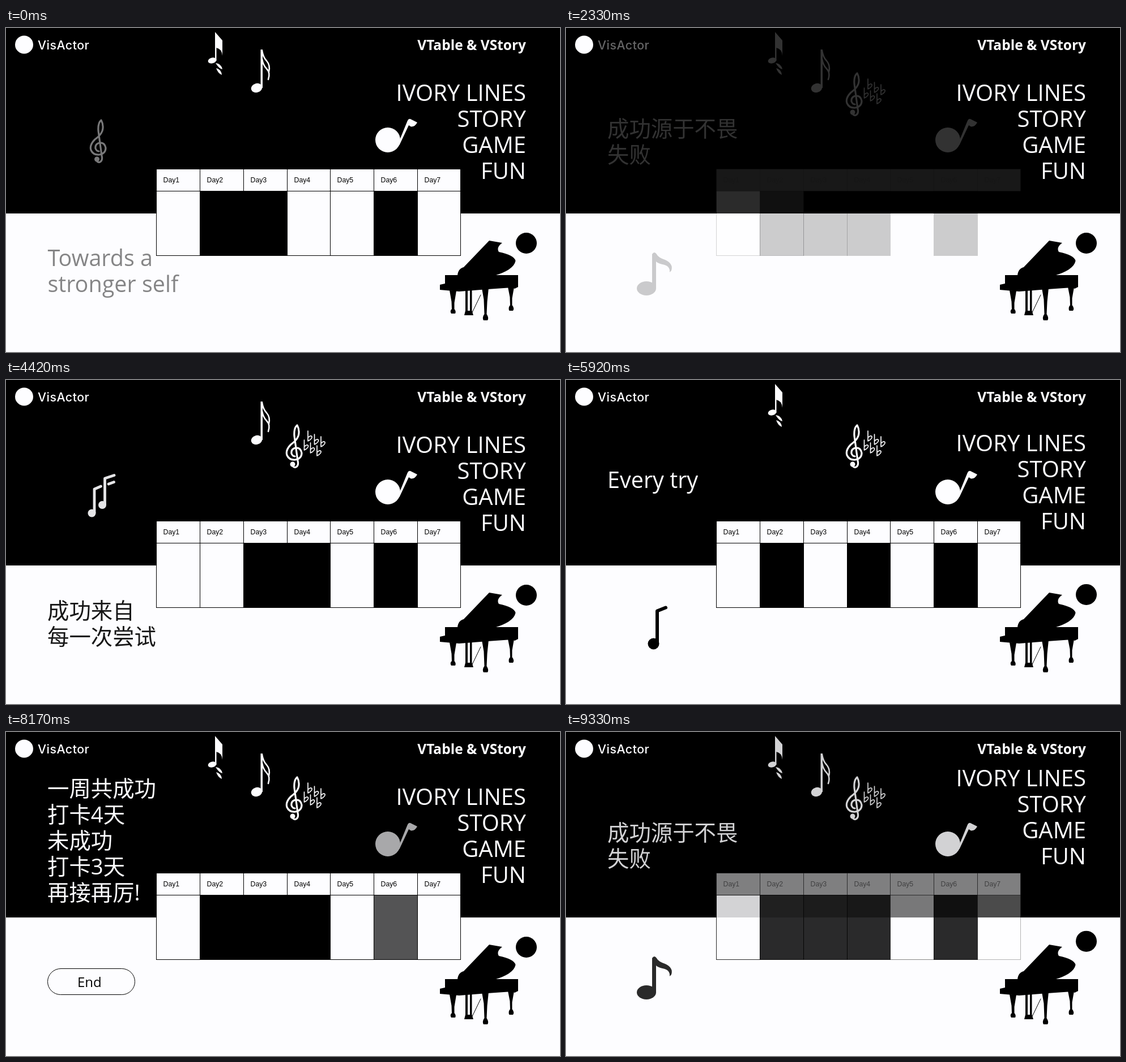
An HTML page that plays this animation: 978 by 573 pixels, repeating every 9.41 s.

```html
<!DOCTYPE html>
<html lang="en">
<head>
<meta charset="utf-8">
<title>Practice week</title>
<style>
  html, body { margin: 0; height: 100%; overflow: hidden; background: #fdfdff; }
  svg { display: block; width: 978px; height: 573px; }
  text { font-family: "Open Sans", "Noto Sans CJK SC", "Noto Sans CJK", sans-serif; font-size: 39.5px; }
  .cjk { font-size: 38.4px; }
  .title { font-size: 40px; text-anchor: end; }
  .label { font: 12.3px "Liberation Sans", Arial, sans-serif; }
  .light { fill: #fdfdff; }
  .line { fill: none; stroke: #000; stroke-linecap: round; stroke-linejoin: round; }
  .light .line, .line.light { fill: none; stroke: #fdfdff; }
</style>
</head>
<body>
<svg viewBox="0 0 978 573">
  <defs>
    <path id="clef" class="line light" stroke-width="3.200" d="M11 70Q13 77 18 75Q23 72 21 64L15 20Q14 6 20 1Q25 10 22 20Q19 28 9 35Q-1 45 2 54Q6 63 17 62Q28 60 28 50Q26 40 17 41Q9 43 10 51Q12 56 16 56"/>
    <path id="flat" class="line light" stroke-width="1.700" d="M0 0V18Q8 14 7 10Q5 7 0 12"/>
  </defs>

  <g id="stage">
    <rect width="978" height="328"/>
    <circle class="light" cx="32" cy="29.500" r="16"/>
    <text class="light" x="918" y="39" text-anchor="end" style="font-size:24.5px;font-weight:700">VTable &amp; VStory</text>
    <g id="title" class="light"></g>
    <g id="piano">
      <path d="M797 438C798 428 802 425 808 423L853 376L876 380Q865 388 870 396Q898 402 899.500 412Q896 428 862 438Z"/>
      <path d="M775 437H904V458L898 461L893 459L850 462L800 466L766 463V454L775 452Z"/>
      <path d="M783 464L795 465L791.500 486V497Q795 501 793 505H786Q783 500 787 497L786.500 484Z"/>
      <path d="M840 460H852L849.500 484L848.500 506Q853 513 850 517H843Q840 512 844.500 506L843.500 480Z"/>
      <path d="M886 458H897L893.500 478V490Q898 496 895 500H888.500Q886 495 890 490L889.500 476Z"/>
      <path d="M811 464H815V500H819V464H822.500V500L825 508H809L811 500Z"/>
      <path class="line" d="M838 472L823 503"/>
    </g>
    <circle id="badge" cx="918.500" cy="380.500" r="18.500"/>
  </g>
  <text id="brand" class="light" x="56" y="38" style="font:500 21.3px Inter,sans-serif;letter-spacing:.5px">VisActor</text>

  <g id="table"></g>

  <g class="light">
    <g id="note2">
      <ellipse cx="364" cy="57.500" rx="7.500" ry="5" transform="rotate(-15 364 57.5)"/>
      <path d="M369 7L382 22V49Q381 37 371.500 35V58H369ZM370 62Q380 63 382 73Q376 72 370 62ZM371 71Q380 73 381 83Q374 80 371 71Z"/>
    </g>
    <g id="note3">
      <ellipse cx="442.500" cy="106" rx="10" ry="8" transform="rotate(-18 442.5 106)"/>
      <path d="M449.500 38H453V106H449.500Z"/>
      <path class="line" stroke-width="2.600" d="M452 40Q454 52 460 58Q467 66 464 78M452 55Q454 66 460 72Q467 79 463 91"/>
    </g>
    <g id="note4">
      <use href="#clef" x="494" y="79"/>
      <circle cx="506" cy="149" r="4.500"/>
      <use href="#flat" x="533" y="90"/><use href="#flat" x="544.500" y="96"/><use href="#flat" x="556" y="100"/>
      <use href="#flat" x="526.500" y="106"/><use href="#flat" x="537.500" y="111"/><use href="#flat" x="549" y="116"/>
    </g>
    <g id="note6">
      <circle cx="674" cy="198" r="22"/>
      <path d="M688 215L708 166Q710 160 714 161L726 167Q722 175 715 174.500L711 172L695 206Z"/>
    </g>
  </g>

  <g class="scene" data-in="2170" data-out="3620">
    <text class="cjk light" x="73" y="191.500">成功源于不畏</text>
    <text class="cjk light" x="73" y="237.500">失败</text>
    <ellipse cx="142" cy="460.500" rx="17" ry="12.500"/>
    <path d="M152 400Q156 394 160 400Q163 406 175 410Q190 417 186 429L183 432Q184 420 170 418Q162 416 159 413V461H152Z"/>
  </g>
  <g class="scene" data-in="3680" data-out="4600">
    <circle class="light" cx="151.500" cy="235.500" r="7"/>
    <circle class="light" cx="170" cy="221" r="7"/>
    <path class="line light" stroke-width="4.800" d="M156 235V193L167.500 188M174.500 220V174L191 168.500M181 184L190.500 180.500"/>
    <text class="cjk" x="73" y="422">成功来自</text>
    <text class="cjk" x="73" y="468">每一次尝试</text>
  </g>
  <g class="scene" data-in="4640" data-out="5980">
    <text class="light" x="73" y="191">Every try</text>
    <circle cx="154.500" cy="466.500" r="10"/>
    <path class="line" stroke-width="6" d="M161 466V408.500L176 402.500"/>
  </g>
  <g class="scene" data-in="6090" data-out="7100">
    <use href="#clef" x="148" y="162"/>
    <circle class="light" cx="160.500" cy="232" r="4.500"/>
    <text x="73.500" y="421">Towards a</text>
    <text x="73.500" y="467">stronger self</text>
  </g>
  <g id="ending">
    <g id="summary" class="light"></g>
    <rect class="line" x="73.500" y="418.500" width="154" height="46" rx="23"/>
    <text x="126" y="451" style="font-size:24px">End</text>
  </g>
</svg>

<script>
const LOOP = 9410, CYCLE = 6480, CYCLE_START = 600, RESET = 1930;
const FADE_IN = 820, FADE_OUT = 250;
const BOUNCES = [2365, 4600], BOUNCE_TIME = 1360;

// Day tiles: when each one is lifted and put back
const TILES = {
  2: { out: 3620, back: 4600 },
  3: { out: 4600, back: 5980 },
  4: { out: 5980, back: 620 },
  6: { out: 1608 }
};

const $ = id => document.getElementById(id);
const ramp = (p, start, length) => Math.min(1, Math.max(0, (p - start) / length));
const fade = (el, value) => el.setAttribute('opacity', value.toFixed(3));

// Fill, border and text blend separately, so borders and labels turn grey
function fadeParts(el, value) {
  el.setAttribute('fill-opacity', value.toFixed(3));
  el.setAttribute('stroke-opacity', value.toFixed(3));
}

function add(parent, tag, attrs, text = '') {
  const el = document.createElementNS('http://www.w3.org/2000/svg', tag);
  for (const key in attrs) el.setAttribute(key, attrs[key]);
  el.textContent = text;
  return parent.appendChild(el);
}

['IVORY LINES', 'STORY', 'GAME', 'FUN'].forEach((line, i) =>
  add($('title'), 'text', { class: 'title', x: 918, y: 129 + 46 * i }, line));
['一周共成功', '打卡4天', '未成功', '打卡3天', '再接再厉!'].forEach((line, i) =>
  add($('summary'), 'text', { class: 'cjk', x: 73, y: 114 + 46 * i }, line));

const header = add($('table'), 'g', {});
const cells = [], covers = {};
for (let day = 1; day <= 7; day++) {
  const edge = n => Math.round(265.4 + 76.7 * n) + 0.5;
  const x = edge(day - 1), width = edge(day) - x;
  const box = { x, width, fill: '#fdfdff', stroke: '#000' };
  add(header, 'rect', { ...box, y: 249.5, height: 39 });
  add(header, 'text', { class: 'label', x: x + 12, y: 273.3 }, 'Day' + day);
  cells.push(add($('table'), 'rect', { ...box, y: 288.5, height: 114 }));
  if (TILES[day]) covers[day] = add($('table'), 'rect', { x: x - 0.5, y: 288, width: width + 1, height: 115 });
}

function tileOpacity(p, { out, back }) {
  if (p < RESET) {
    if (out < RESET) return 1 - ramp(p, out, FADE_OUT);
    return back < RESET ? ramp(p, back, FADE_OUT) : 1;
  }
  const lifted = out < RESET ? 0 : ramp(p, out, FADE_OUT);
  const returned = back > RESET ? ramp(p, back, FADE_OUT) : 0;
  return ramp(p, 2170, FADE_IN) * (1 - lifted) + returned;
}

function draw(time) {
  const p = (time % LOOP - CYCLE_START + CYCLE) % CYCLE + CYCLE_START;
  const enter = (start, length) => p < RESET ? 1 : ramp(p, start, length);

  fade($('stage'), enter(RESET, 250));
  fade($('brand'), enter(2050, 700));
  fadeParts(header, enter(2210, 1280));
  cells.forEach((cell, i) => fadeParts(cell, enter(2200 + 70 * i, 780)));

  for (const day in TILES) {
    const value = tileOpacity(p, TILES[day]);
    fade(covers[day], value);
    fade($('note' + day), value);
  }

  for (const scene of document.querySelectorAll('.scene')) {
    const start = +scene.dataset.in, out = +scene.dataset.out;
    // the last scene leaves after the cycle wraps
    const q = out > CYCLE && p < RESET ? p + CYCLE : p;
    fade(scene, ramp(q, start, FADE_IN) * (1 - ramp(q, out, FADE_OUT)));
  }
  fade($('ending'), p < RESET ? ramp(p, 630, 800) : 0);

  const lift = BOUNCES.reduce((sum, start) => sum + Math.sin(Math.PI * ramp(p, start, BOUNCE_TIME)), 0);
  $('title').setAttribute('transform', `translate(0 ${-36.5 * lift})`);
  $('badge').setAttribute('transform', `translate(0 ${-11.5 * lift})`);
}

const begin = performance.now();
(function tick() {
  draw(performance.now() - begin);
  requestAnimationFrame(tick);
})();
</script>
</body>
</html>
```
